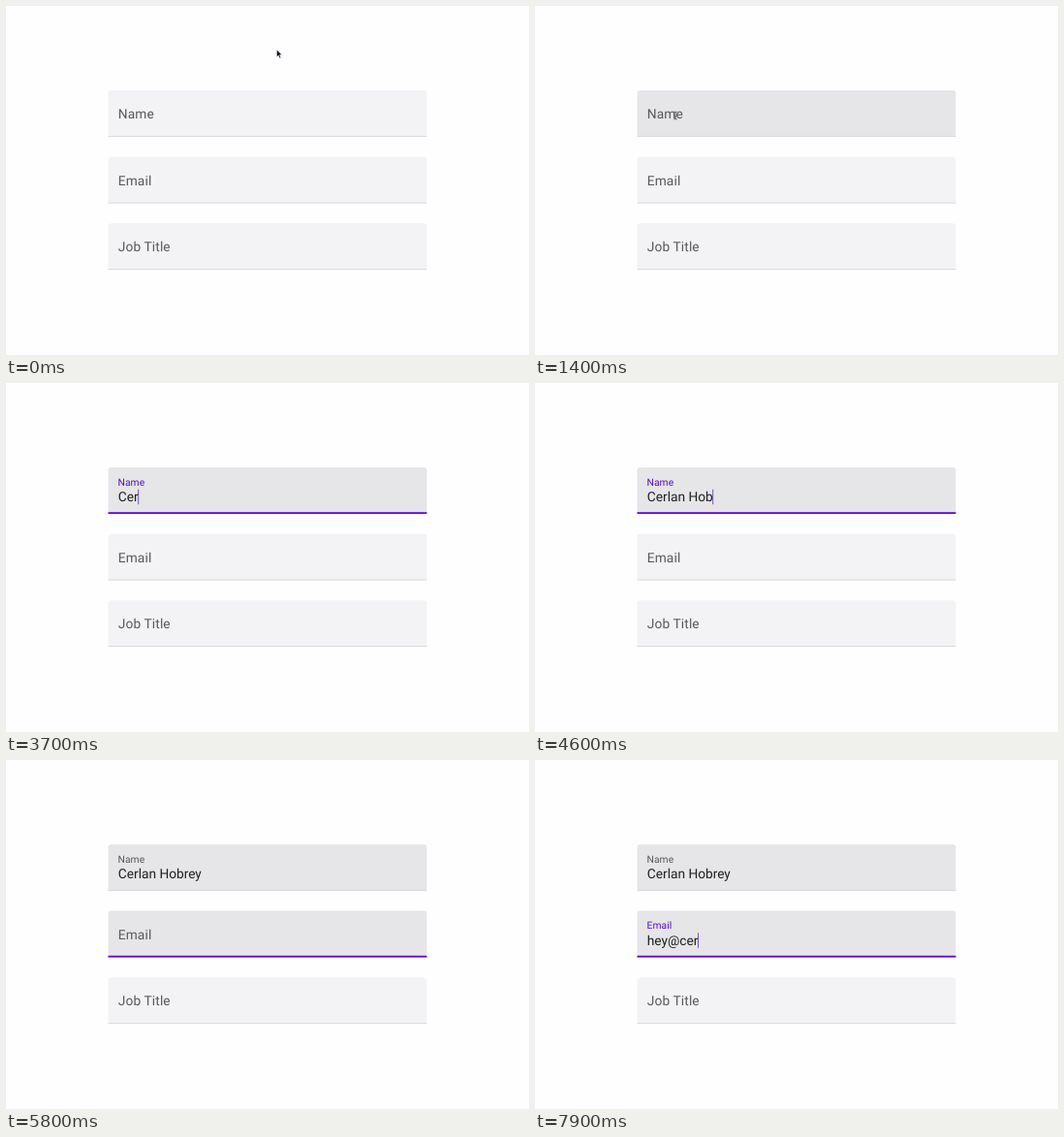
These frames come from a looping animation (540 px wide and 360 px high, 8 s). An HTML page:

```html
<!DOCTYPE html>
<html lang="en">
<head>
<meta charset="utf-8">
<title>Text fields</title>
<style>
  html, body { margin: 0; width: 100%; height: 100%; overflow: hidden; background: #fefdff; }
  svg { display: block; width: 540px; height: 360px; }
  text { font-family: Roboto, Arial, sans-serif; font-size: 13.71px; white-space: pre; text-rendering: geometricPrecision; }
  .label { letter-spacing: .009375em; }
</style>
</head>
<body>
<svg id="stage" viewBox="0 0 540 360"></svg>
<script>
const LOOP = 8000, STEP = 100;
const LEFT = 105.5, WIDTH = 329, HEIGHT = 48, TEXT_X = 115.8;
const IDLE = [243, 242, 244], ACTIVE = [230, 229, 231];
const GREY = [88, 87, 90], PURPLE = [90, 12, 208];
const DARK_LINE = [96, 95, 98], PALE_LINE = [216, 215, 218];
const stage = document.getElementById('stage');

const clamp = v => Math.max(0, Math.min(1, v));
const smooth = v => { v = clamp(v); return v * v * (3 - 2 * v); };
const ramp = (t, start, length) => smooth((t - start) / length);
const lerp = (a, b, p) => a + (b - a) * p;
const mix = (a, b, p) => `rgb(${a.map((v, i) => Math.round(lerp(v, b[i], p)))})`;

function add(tag, attrs, parent = stage) {
  const node = document.createElementNS('http://www.w3.org/2000/svg', tag);
  set(node, attrs);
  parent.appendChild(node);
  return node;
}
function set(node, attrs) {
  for (const key in attrs) node.setAttribute(key, attrs[key]);
}

function makeField(title, top, script) {
  const r = 3.43, bottom = top + HEIGHT;
  const field = { top, ...script };
  field.box = add('path', {
    d: `M${LEFT} ${bottom}V${top + r}q0 ${-r} ${r} ${-r}h${WIDTH - 2 * r}q${r} 0 ${r} ${r}V${bottom}z`
  });
  field.line = add('rect', { x: LEFT, y: bottom - .9, width: WIDTH, height: .9 });
  field.ripple = add('rect', { x: LEFT, y: bottom - 1.75, width: WIDTH, height: 1.75, fill: '#5a05dd' });
  field.label = add('text', { class: 'label' });
  field.label.textContent = title;
  field.input = add('text', { x: TEXT_X, y: top + 35.2, fill: '#1f1e20' });
  field.caret = add('rect', { width: .9, height: 15.5, fill: '#5b33ad' });
  return field;
}

// keys: the time at which each character of the value appears
const fields = [
  makeField('Name', 87, {
    value: 'Cerlan Hobrey', hover: 850, focus: 1600, blur: 5200, blink: [2200, 2700],
    keys: [3200, 3400, 3700, 3800, 3900, 4000, 4100, 4400, 4500, 4600, 4700, 4900, 5000]
  }),
  makeField('Email', 155.57, {
    value: 'hey@cer', hover: 5200, focus: 5200, blur: Infinity, blink: [5800, 6400],
    keys: [6700, 6800, 7000, 7400, 7600, 7700, 7900]
  }),
  makeField('Job Title', 224.14, {
    value: '', hover: Infinity, focus: Infinity, blur: Infinity, blink: [0, 0], keys: []
  })
];

const arrow = add('path', {
  d: 'M0 0V7.6L1.8 6L3 8.9L4.3 8.3L3.1 5.5H5.4Z',
  fill: '#111', stroke: '#fff', 'stroke-width': .5
});
const beam = add('g', {});
const beamPath = 'M-1.7-4Q0-4 0-3Q0-4 1.7-4M0-3V3M-1.7 4Q0 4 0 3Q0 4 1.7 4M-.9 1H.9';
add('path', { d: beamPath, fill: 'none', stroke: '#fff', 'stroke-width': 1.5, 'stroke-opacity': .6 }, beam);
add('path', { d: beamPath, fill: 'none', stroke: '#333', 'stroke-width': .8 }, beam);

function drawField(f, t) {
  const focused = t >= f.focus && t < f.blur;
  const leaving = ramp(t, f.blur, 200);
  const started = f.keys.length > 0 && t >= f.keys[0];
  const float = started ? ramp(t, f.keys[0] - 50, 200) : 0;
  const size = lerp(13.71, 10.28, float);

  set(f.box, { fill: mix(IDLE, ACTIVE, ramp(t, f.hover, 200)) });
  set(f.line, { fill: mix(DARK_LINE, PALE_LINE, t >= f.blur ? leaving : 1) });
  set(f.ripple, { opacity: focused ? ramp(t, f.focus - 80, 180) : 0 });
  set(f.label, {
    x: lerp(TEXT_X, 115.5, float), y: f.top + lerp(29.2, 18.6, float),
    style: `font-size:${size}px`,
    fill: mix(GREY, PURPLE, started ? 1 - leaving : 0)
  });

  f.input.textContent = f.value.slice(0, f.keys.filter(k => t >= k).length);
  const hidden = t >= f.blink[0] && t < f.blink[1];
  set(f.caret, {
    x: TEXT_X - .4 + (started ? f.input.getComputedTextLength() : 0),
    y: f.top + (started ? 22.7 : 15.7),
    opacity: focused && !hidden ? .9 : 0
  });
}

function pointerAt(t) {
  const u = ramp(t, 100, 900), v = 1 - u;
  const bezier = (a, b, c, d) => a * v ** 3 + 3 * b * u * v * v + 3 * c * u * u * v + d * u ** 3;
  const settle = ramp(t, 1000, 400);
  return [
    bezier(279.5, 265, 150, 135) + 10 * settle,
    bezier(45, 36, 60, 101) + 12 * settle
  ];
}

function draw(t) {
  fields.forEach(f => drawField(f, t));
  const [x, y] = pointerAt(t);
  const inside = y > fields[0].top;
  const transform = `translate(${x} ${y})`;
  set(arrow, { transform, opacity: inside ? 0 : 1 });
  set(beam, { transform, opacity: inside && t < 3200 ? 1 : 0 });
}

const begin = performance.now();
function tick() {
  const t = (performance.now() - begin) % LOOP;
  draw(Math.floor(t / STEP) * STEP);
  requestAnimationFrame(tick);
}
tick();
</script>
</body>
</html>
```
